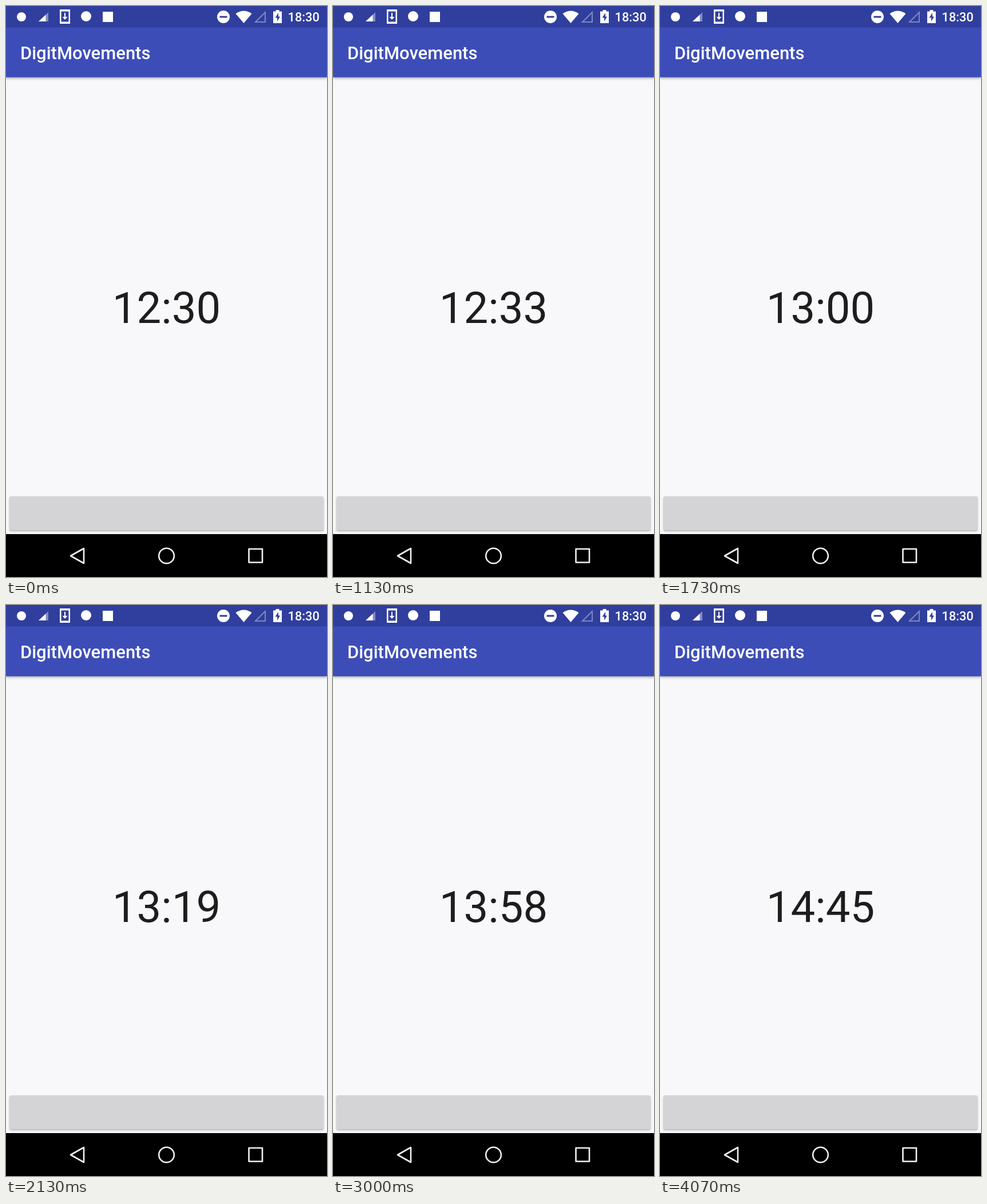
Recreate the animation shown at these times as an HTML page. Size 561 by 998 pixels, loop 4140 ms.

```html
<!DOCTYPE html>
<html lang="en">
<head>
<meta charset="utf-8">
<title>Time counter</title>
<style>
  html, body { margin: 0; width: 100%; height: 100%; overflow: hidden; background: #000; }
  svg { display: block; width: 100%; height: 100%; }
  text { font-family: Roboto, sans-serif; }
  .label { font-weight: 500; fill: #fff; }
  .toolbar { filter: drop-shadow(0 2px 2px rgba(0, 0, 0, .3)); }
  .button { filter: drop-shadow(0 2px 1.5px rgba(0, 0, 0, .28)); }
</style>
</head>
<body>
<svg viewBox="0 0 561 998">
  <rect width="561" height="923" fill="#f8f8fb"/>
  <rect class="toolbar" width="561" height="124.6" fill="#3d4db8"/>
  <rect width="561" height="37.4" fill="#303f9d"/>
  <text class="label" x="24.9" y="93" font-size="31">DigitMovements</text>

  <g id="status" fill="#fff">
    <circle cx="27" cy="19" r="8"/>
    <path d="M57 27L74 11V27Z" opacity=".4"/>
    <path d="M57 27L69.5 15.2V27Z"/>
    <path d="M94 6H112V31H94ZM96.500 9.500V27.500H109.500V9.500Z" fill-rule="evenodd"/>
    <path d="M102 12H104V19H107.500L103 24L98.500 19H102Z"/>
    <circle cx="140" cy="18" r="9"/>
    <rect x="169" y="10" width="18" height="18"/>
    <circle cx="380" cy="19" r="11"/>
    <rect x="373.500" y="17.500" width="13" height="3" fill="#303f9d"/>
    <path d="M401.500 13.500Q415.500 3.500 429.500 13.500L415.500 30Z"/>
    <path d="M436 28L453 11V28Z" fill="none" stroke="#fff" stroke-width="2" opacity=".38"/>
    <path d="M471.500 7H477.500V9.500H482V30H467V9.500H471.500Z"/>
    <path d="M476 12L470.500 20.500H474V27L479 18.500H476Z" fill="#303f9d"/>
    <text class="label" x="492.500" y="27" font-size="21.8">18:30</text>
  </g>

  <text id="time" x="280.500" y="553.800" font-size="76" text-anchor="middle" fill="#1d1d1d">12:30</text>

  <rect class="button" x="6" y="857" width="549" height="59" rx="3" fill="#d4d4d6"/>
  <circle id="touch" cx="272" cy="888" r="17" fill="#ededee" stroke="#c5c5df" stroke-width="1.500" visibility="hidden"/>

  <rect y="923" width="561" height="75"/>
  <g fill="none" stroke="#f2f2f2" stroke-width="2.600" stroke-linejoin="round">
    <path d="M113 961L136 948V974Z"/>
    <circle cx="280.500" cy="961" r="13.300"/>
    <rect x="424.500" y="949" width="23.500" height="23.500"/>
  </g>
</svg>
<script>
  const LOOP = 4140, STEP = 1000 / 15;
  const PRESS = 14, RELEASE = 16;
  // [step, minutes added]; the count is nearly linear with slight timing jitter
  const KEYS = [[RELEASE, 0], [21, 15], [32, 49], [45, 88], [51, 105], [61, 135]];
  const time = document.getElementById('time');
  const touch = document.getElementById('touch');

  function minutesAt(step) {
    if (step <= RELEASE) return 0;
    const i = KEYS.findIndex(([s]) => s >= step);
    if (i < 0) return 135;
    const [s0, m0] = KEYS[i - 1], [s1, m1] = KEYS[i];
    return Math.round(m0 + (m1 - m0) * (step - s0) / (s1 - s0));
  }

  function draw(now) {
    const step = Math.floor((now % LOOP + 4) / STEP);
    const total = 12 * 60 + 30 + minutesAt(step);
    time.textContent = Math.floor(total / 60) + ':' + String(total % 60).padStart(2, '0');
    touch.setAttribute('visibility', step >= PRESS && step < RELEASE ? 'visible' : 'hidden');
  }

  const start = performance.now();
  function tick() {
    draw(performance.now() - start);
    requestAnimationFrame(tick);
  }
  tick();
</script>
</body>
</html>
```
